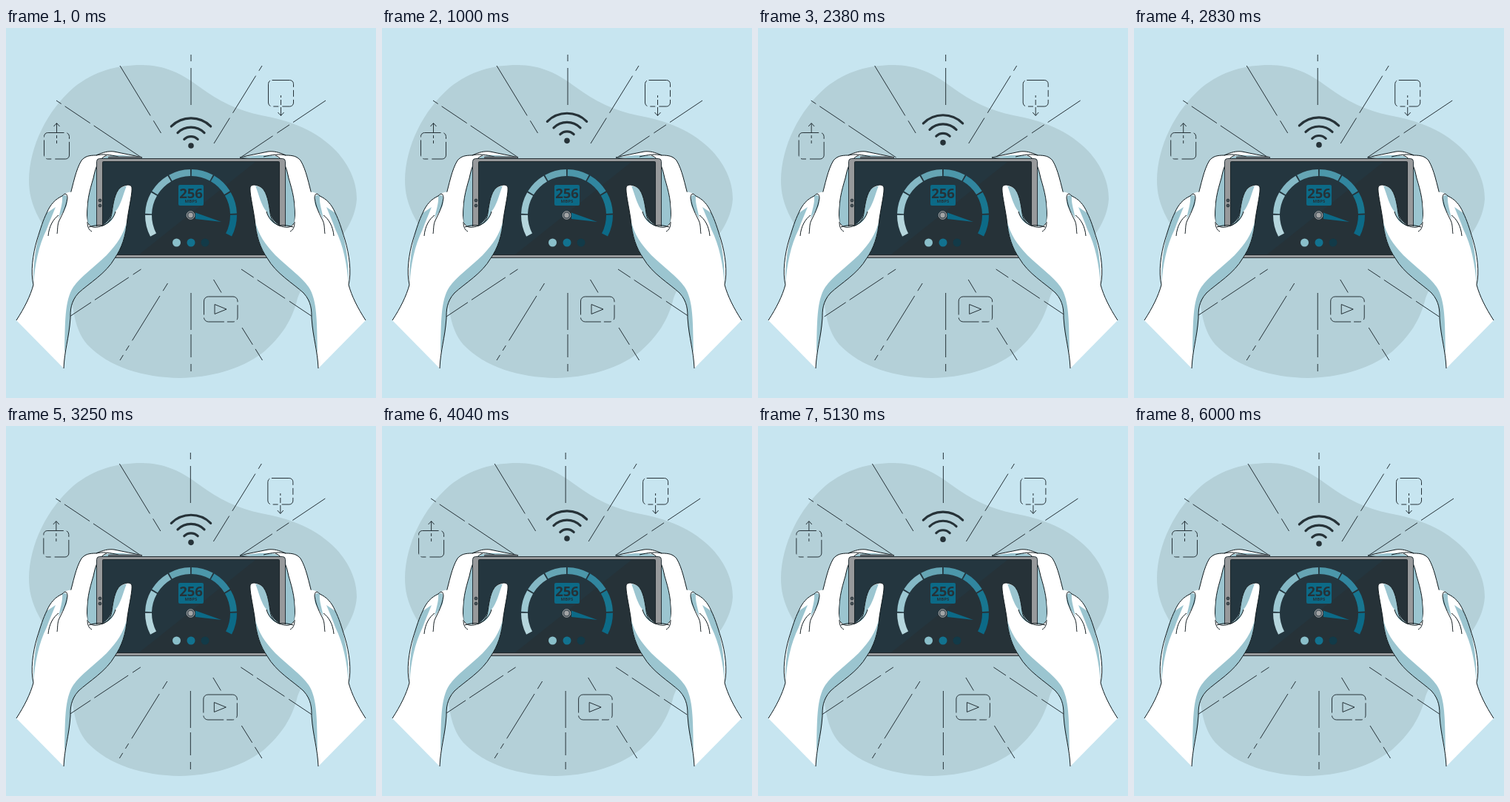
Write an HTML page with a canvas that moves like this. It is 500 px wide and 500 px high and loops after 6.04 s.

```html
<!DOCTYPE html>
<html lang="en">
<head>
<meta charset="utf-8">
<title>Speed test</title>
<style>
html, body { margin: 0; width: 100%; height: 100%; overflow: hidden; background: #c7e5f0; }
canvas { display: block; width: 500px; height: 500px; }
</style>
</head>
<body>
<canvas id="stage" width="500" height="500"></canvas>
<script>
const ctx = document.getElementById('stage').getContext('2d');
const LOOP = 6040;
const INK = '#263238', LINE = '#101a1e', SHADE = '#9bc5d0', TEAL = '#0c6a87', GRAY = '#97999b';
const rad = deg => deg * Math.PI / 180;

function shape(d, fill, stroke, width = 1) {
  const p = new Path2D(d);
  if (fill) { ctx.fillStyle = fill; ctx.fill(p); }
  if (stroke) { ctx.strokeStyle = stroke; ctx.lineWidth = width; ctx.stroke(p); }
}

function disc(x, y, r, fill, stroke, width = 1) {
  ctx.beginPath();
  ctx.arc(x, y, r, 0, Math.PI * 2);
  if (fill) { ctx.fillStyle = fill; ctx.fill(); }
  if (stroke) { ctx.strokeStyle = stroke; ctx.lineWidth = width; ctx.stroke(); }
}

function box(x, y, w, h, r, fill, stroke, width = 1) {
  ctx.beginPath();
  ctx.roundRect(x, y, w, h, r);
  if (fill) { ctx.fillStyle = fill; ctx.fill(); }
  if (stroke) { ctx.strokeStyle = stroke; ctx.lineWidth = width; ctx.stroke(); }
}

function dashed(dash, draw) {
  ctx.setLineDash(dash);
  draw();
  ctx.setLineDash([]);
}

function backdrop() {
  ctx.fillStyle = '#c7e5f0';
  ctx.fillRect(0, 0, 500, 500);
  shape('M183 50C215 50 238 62 262 80C288 99 312 111 345 118C385 125 420 139 446 166' +
    'C466 188 474 210 474 231C472 262 452 286 432 306C410 328 402 346 394 365' +
    'C387 395 372 417 348 438C315 463 275 472 235 473C185 472 140 459 110 428' +
    'C88 402 92 370 82 330C75 300 55 277 45 258C34 237 31 222 31 205' +
    'C32 160 55 112 92 80C120 58 150 50 183 50Z', '#b4d0d8');
}

// x1, y1, x2, y2, dash pattern
const rays = [
  [250, 36, 250, 104, [9, 9, 50, 9]],
  [154, 51, 209.5, 142, [79, 8, 30, 9]],
  [346, 51, 281, 156, [8, 8, 59, 8, 60, 9]],
  [68, 98, 183, 175, [8, 6, 41, 6, 90, 9]],
  [432, 98, 317, 175, [53, 6, 20, 7, 80, 9]],
  [182.5, 326, 86, 390, [13, 7, 55, 6, 60, 9]],
  [218.5, 345, 154, 449, [12, 8, 71, 8, 8, 7, 20, 9]],
  [250, 358, 250, 464, [50, 6, 31, 9, 20, 9]],
  [280.5, 340, 291, 357.5, [40, 9]],
  [319, 405, 346.5, 449, [27, 7, 40, 9]],
  [318, 326, 414, 390, [20, 6, 45, 7, 60, 9]]
];

function burst(dx) {
  ctx.save();
  ctx.translate(dx, 0);
  for (const [x1, y1, x2, y2, dash] of rays)
    dashed(dash, () => shape(`M${x1} ${y1}L${x2} ${y2}`, null, INK));
  dashed([22, 4, 9, 4, 40, 5, 7, 4], () => box(51.5, 141.5, 34, 35.5, 5, null, INK));
  dashed([13, 3, 4, 3], () => shape('M68.5 129V156', null, INK));
  shape('M64.5 133L68.5 128.5L72.5 133', null, INK);
  dashed([36, 4, 9, 4, 22, 5, 7, 4], () => box(354.5, 70.5, 34, 35.5, 5, null, INK));
  dashed([3, 3, 7, 3, 20, 9], () => shape('M371.5 91V118', null, INK));
  shape('M367.5 114L371.5 118.5L375.5 114', null, INK);
  dashed([44, 4, 20, 4, 10, 4, 30, 4], () => box(267.5, 363, 45.5, 34, 6, null, INK));
  shape('M282 373.5V386.5L298 380Z', null, INK);
  ctx.restore();
}

function wifi(dy) {
  ctx.save();
  ctx.translate(250, 159 + dy);
  disc(0, 0, 3.8, INK);
  ctx.lineCap = 'round';
  ctx.strokeStyle = INK;
  ctx.lineWidth = 3.2;
  for (const r of [13, 25.5, 37.7]) {
    ctx.beginPath();
    ctx.arc(0, .6, r, rad(-135), rad(-45));
    ctx.stroke();
  }
  ctx.restore();
}

function gauge() {
  const tones = ['#b5d6dd', '#9cc8d2', '#84b8c5', '#66a5b4', '#4c97aa', '#31869f', '#187690', TEAL];
  ctx.lineWidth = 9;
  tones.forEach((tone, i) => {
    const a = 151.5 + i * 29.6;
    ctx.strokeStyle = tone;
    ctx.beginPath();
    ctx.arc(250, 253, 57.5, rad(a + .9), rad(a + 28.7));
    ctx.stroke();
  });
  box(233, 212, 34, 28, 2, TEAL);
  ctx.fillStyle = INK;
  ctx.textAlign = 'center';
  ctx.fontStretch = 'extra-condensed';
  ctx.font = 'bold 18.5px "Open Sans", "Noto Sans", sans-serif';
  ctx.fillText('256', 250, 229.5);
  ctx.font = 'bold 6px "Open Sans", "Noto Sans", sans-serif';
  ctx.fillText('MBPS', 250, 236.2);
  shape('M256 249.5L291 262L256 258Z', TEAL);
  disc(249.5, 253, 5.3, '#46525a', '#a3a5a6', 1);
  disc(249.5, 253, 3.2, '#a3a5a6');
  [[230.5, '#8abfca'], [250, '#12728f'], [269, '#123a48']].forEach(([x, c]) => disc(x, 290, 5.5, c));
}

function phone() {
  box(138, 173.5, 45, 4, 1, '#596065');
  box(122.5, 176.5, 255, 134, 4, GRAY, INK);
  box(130.5, 180.5, 239, 126, 1, INK);
  shape('M131 181H337L180 306H131Z', '#24363f');
  box(130.5, 180.5, 239, 126, 1, null, '#1d272c');
  for (const y of [233, 240]) disc(127, y, 1.9, '#4c555a', INK);
  gauge();
}

function backFingers() {
  shape('M86 228C91 211 94 192 102 179C107 173 113 172 122 172C131 168 138 166 146 167' +
    'C160 170 172 172 184 175L140 180L130 270H104Z', '#fff', LINE);
  shape('M184 175C168 173 150 170 136 173C124 178 121 188 118 203C113 220 108 236 110 264L116 271H130L134 178Z', SHADE);
  shape('M136 172C124 177 121 189 118 203C113 220 108 236 110 264M122 172C130 170 140 171 152 174', null, LINE);
}

function frontHand() {
  shape('M14 395C25 378 33 362 37 347C33 330 36 306 42 286C47 270 50 260 55 250' +
    'C60 238 67 231 76 227C80 222 86 221 91 222C104 222 110 220 110 235C109 245 108 256 111 264' +
    'C115 270 122 268 130 267C137 263 142 257 143 250C145 236 147 223 154 216' +
    'C160 212 168 210 170 215C171 222 167 238 164 258C162 282 156 298 147 311' +
    'C135 332 112 345 98 358C87 370 87 382 87 392C85 420 79 435 78 460Z', '#fff');
  shape('M164 259C159 280 149 293 136 307C118 324 101 336 91 350C79 368 80 398 79 440' +
    'C82 424 87 410 87 392C87 382 87 370 98 358C112 345 135 332 147 311C156 298 162 282 164 259Z', SHADE);
  shape('M154 216C147 223 145 236 143 250C142 257 137 263 130 267C139 266 146 258 148 248C155 240 158 226 163 213Z', SHADE);
  shape('M55 250C48 262 36 300 37 347C39 320 44 294 55 272C58 263 63 252 67 242Z', SHADE);
  shape('M76 227C83 222 84 232 82 240C79 247 74 252 71 258C73 246 77 237 76 227Z', SHADE);
  shape('M14 395C25 378 33 362 37 347C33 330 36 306 42 286C47 270 50 260 55 250C60 238 67 231 76 227' +
    'C80 222 83 224 83 230C81 243 76 252 72 260C69 266 70 274 69 278M71 253C64 258 58 268 57 281' +
    'M111 264C115 271 122 270 131 267C140 263 142 257 143 250C145 236 147 223 154 216' +
    'C160 212 168 210 170 215C171 222 167 238 164 258C162 282 156 298 147 311' +
    'C135 332 112 345 98 358C87 370 87 382 87 392C85 420 79 435 78 460' +
    'M110 262C110 269 112 273 116 275M131 267C124 266 117 267 112 269M148 248C146 256 140 263 131 267', null, LINE);
}

function mirrored(draw) {
  draw();
  ctx.save();
  ctx.translate(500, 0);
  ctx.scale(-1, 1);
  draw();
  ctx.restore();
}

const sway = [0, -1, 2, -4, 4, -4, 4, -4, 2, -1, 0];

function render(ms) {
  // 24 poses per second
  const s = Math.floor((ms % LOOP) * .024 + .2) / 24 % 6;
  const i = Math.floor(s / .6 + 1e-9), f = s / .6 - i;
  const dx = sway[i] + (sway[i + 1] - sway[i]) * f;
  const dy = -10 * (1 - Math.abs(1 - s % 3 / 1.5));
  backdrop();
  burst(dx);
  wifi(dy);
  mirrored(backFingers);
  phone();
  mirrored(frontHand);
}

const start = performance.now();
function tick() {
  render(performance.now() - start);
  requestAnimationFrame(tick);
}
tick();
</script>
</body>
</html>
```
